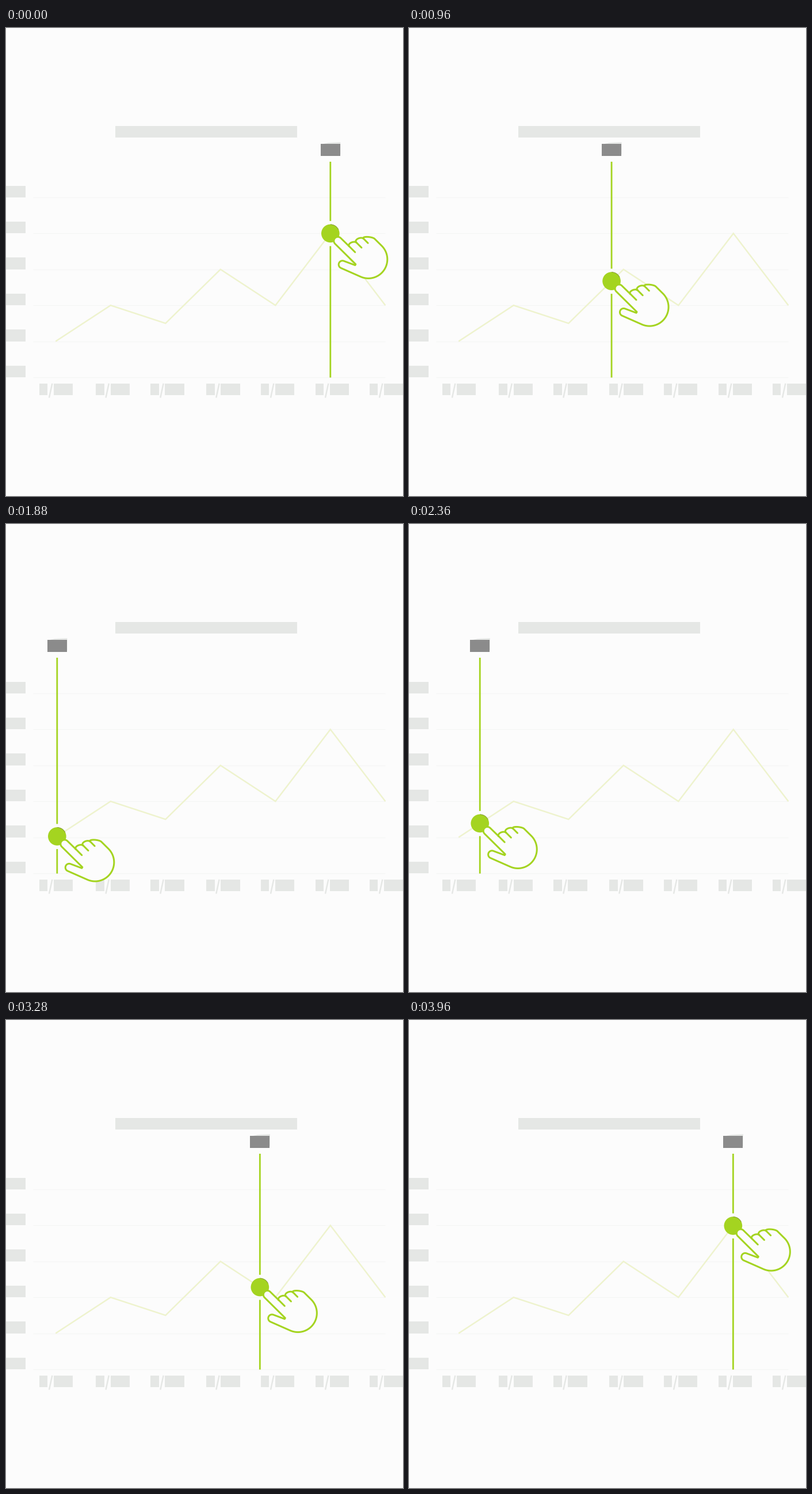
Write a matplotlib script that moves like this. It is 690x812 px and loops after 4 s.

```python
import numpy as np
import matplotlib.pyplot as plt
from matplotlib.animation import FuncAnimation
from matplotlib.patches import Arc, Circle, Polygon, Rectangle
from matplotlib.transforms import Affine2D

W, H, DPI = 690, 812, 64
FRAMES, STEP = 100, 40
MOVE = 49  # frames per sweep
PX = 72 / DPI
BASE, ROW = 606, 62.4

BG = "#fcfcfc"
GREEN = "#a4d420"
PALE = "#eef3cd"
GRID = "#f5f6f5"
GREY = "#e5e7e5"
DARK = "#8b8b8b"

fig = plt.figure(figsize=(W / DPI, H / DPI), dpi=DPI, facecolor=BG)
ax = fig.add_axes([0, 0, 1, 1])
ax.set_xlim(0, W)
ax.set_ylim(H, 0)
ax.axis("off")


def line(xs, ys, color, width, z=1, **style):
    return ax.plot(xs, ys, color=color, lw=width * PX, zorder=z,
                   solid_joinstyle="miter", **style)[0]


def box(x, y, w, h, color=GREY, z=1):
    return ax.add_patch(Rectangle((x, y), w, h, fc=color, lw=0, zorder=z))


def arc(cx, cy, r, start, end):
    a = np.radians(np.linspace(start, end, 40))
    return np.column_stack([cx + r * np.cos(a), cy + r * np.sin(a)])


def tilt(along, across):
    """Map finger coordinates (pointing 45 degrees up-left) to the stage."""
    return np.column_stack([along + across, along - across]) / np.sqrt(2)


# Chart background
box(190, 169.5, 316, 20.5)
for i in range(6):
    y = BASE - ROW * i
    line([47, 659], [y, y], GRID, 1.2, solid_capstyle="butt")
    box(0, y - 20.5, 33.5, 20.5)

for x in (57.5, 156, 250.8, 347.8, 442.5, 537.5, 631.5):
    box(x, 616.5, 14.7, 20.5)
    line([x + 17.5, x + 22.8], [641.5, 616.8], GREY, 2.4, solid_capstyle="butt")
    box(x + 25.5, 616.5, 33.2, 20.5)

xs = 86.3 + 95.5 * np.arange(7)
ys = BASE - ROW * np.array([1, 2, 1.5, 3, 2, 4, 2])
line(xs, ys, PALE, 2.4, 2, solid_capstyle="butt")

# Moving parts, drawn around the origin
upper, lower = (line([0, 0], [0, 1], GREEN, 2.8, 3, solid_capstyle="butt", snap=False)
                for _ in range(2))

tag = [
    ax.add_patch(Polygon([(-16.5, 202), (-4, 199), (17.5, 198), (17.5, 219)],
                         fc=GREY, lw=0, zorder=3)),
    box(-17, 200.7, 33.7, 21, DARK, 4),
]

# Hand outline: fingertip, three knuckles, palm, thumb
bend = np.linspace(-np.pi / 2, np.pi / 2, 30)
knuckles = [tilt(u + lean * np.sin(bend) - 4.5 * np.cos(bend),
                 14 + 13.5 * i + 6.75 * np.sin(bend))
            for i, (u, lean) in enumerate([(41.2, 2.2), (44.8, 2.2), (54, 7)])]
outline = np.vstack([arc(13, 13, 7, 135, 315), *knuckles,
                     arc(66, 45, 33, -45, 114),
                     arc(21, 54, 6.6, 114, 291),
                     [(43, 55.2), (44, 53.5)]])

hand = [
    ax.add_patch(Circle((0, 0), 15.8, fc=GREEN, lw=0, zorder=4)),
    ax.add_patch(Arc((0, 0), 31, 31, theta1=270, theta2=335, color="#80903c",
                     lw=0.8 * PX, zorder=5)),
    ax.add_patch(Polygon(outline, fc=BG, ec=GREEN, lw=3 * PX, zorder=6,
                         joinstyle="round")),
]
for i in range(3):
    crease = tilt(np.array([39 + 3.6 * i, 53.5 + 2.3 * i]), np.full(2, 7.3 + 13.5 * i))
    hand.append(line(*crease.T, GREEN, 3, 7, solid_capstyle="round", snap=False))

slide, follow = Affine2D(), Affine2D()
for part in tag:
    part.set_transform(slide + ax.transData)
for part in hand:
    part.set_transform(follow + ax.transData)

# The dot follows the line by arc length
px, py = xs[:6], ys[:6]
dist = np.concatenate([[0], np.cumsum(np.hypot(np.diff(px), np.diff(py)))])


def position(n):
    s = 1 - n / MOVE if n < FRAMES / 2 else (n - FRAMES + MOVE) / MOVE
    s = min(max(s, 0), 1)
    d = dist[-1] * s * s * (3 - 2 * s)
    return np.interp(d, dist, px), np.interp(d, dist, py)


def draw(n):
    x, y = position(n)
    slide.clear().translate(x, 0)
    follow.clear().translate(x, y)
    upper.set_data([x, x], [232, y - 21.5])
    lower.set_data([x, x], [y + 22, 606.5])
    return [upper, lower, *tag, *hand]


anim = FuncAnimation(fig, draw, frames=FRAMES, interval=STEP,
                     init_func=lambda: draw(0), repeat=True, repeat_delay=0, blit=False)
plt.show()
```
